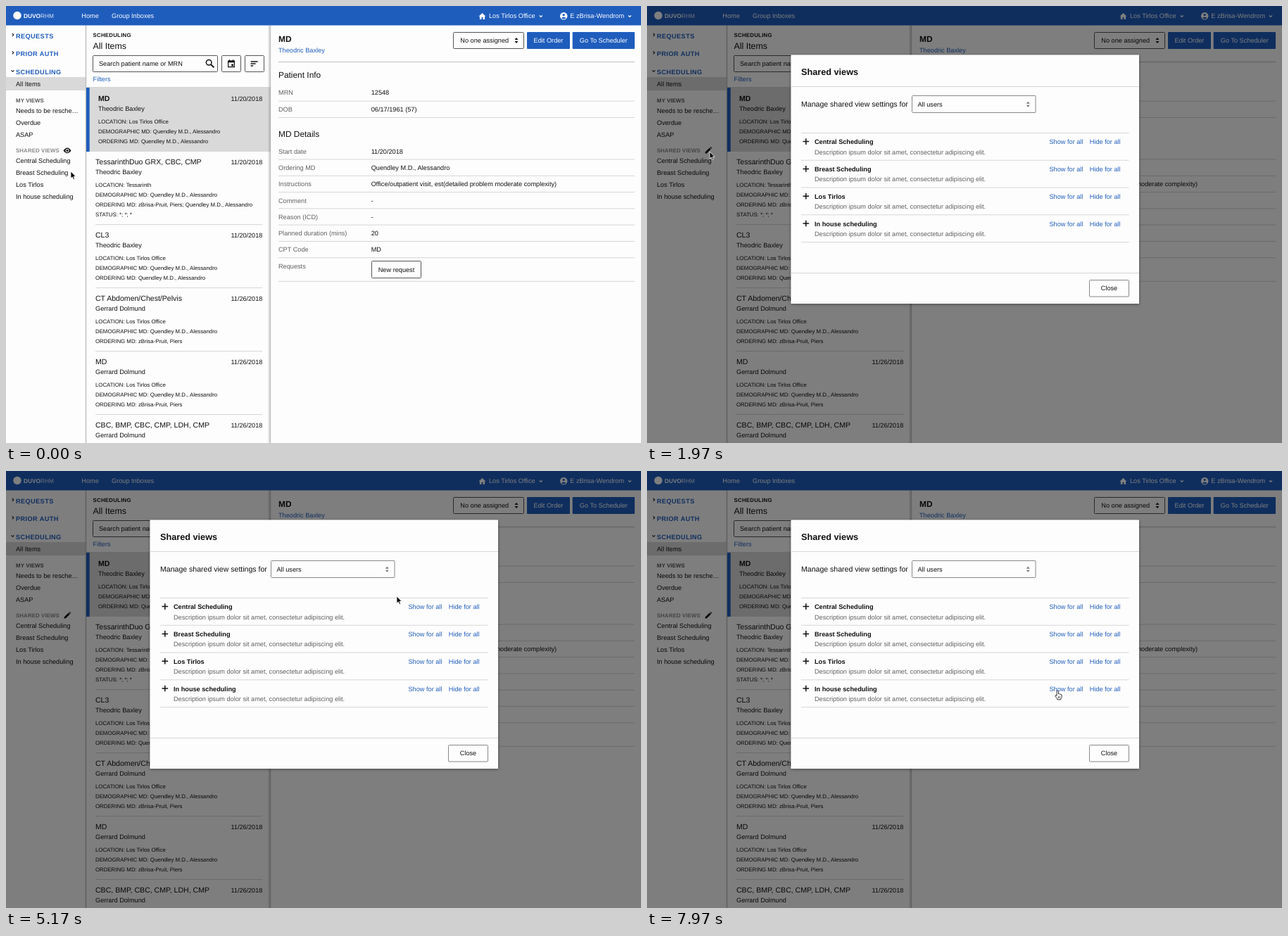
Recreate the animation shown at these times as an HTML page. Size 902 by 621 pixels, loop 8 s.

```html
<!DOCTYPE html>
<html lang="en">
<head>
<meta charset="utf-8">
<title>Scheduling</title>
<style>
  html, body { margin: 0; width: 100%; height: 100%; overflow: hidden; background: #fdfdfd; }
  svg { display: block; width: 902px; height: 621px; }
  text { font-family: "Liberation Sans", Arial, sans-serif; white-space: pre; text-rendering: geometricPrecision; }
</style>
</head>
<body>
<svg id="stage" viewBox="0 0 902 621"></svg>
<script>
const BLUE = '#1f5dbd', INK = '#111', GRAY = '#5f5f5f', RULE = '#d6d6d6', PAPER = '#fdfdfd';
const BODY = 9.18, SMALL = 7.83, ITEM = 10.55, HEADING = 11.9;
const LOOP = 8000, OPEN_AT = 1970;

const OFFICE = 'Los Tirlos Office';
const DOCTOR = 'Quendley M.D., Alessandro';
const SCHEDULER = 'zBrisa-Pruit, Piers';
const PATIENT_A = 'Theodric Baxley', PATIENT_B = 'Gerrard Dolmund';

const text = (x, y, str, { size = BODY, fill = INK, bold = false, anchor = 'start', spacing = 0 } = {}) =>
  `<text x="${x}" y="${y}" font-size="${size}" fill="${fill}" font-weight="${bold ? 700 : 400}" ` +
  `text-anchor="${anchor}" letter-spacing="${spacing}">${str}</text>`;
const rect = (x, y, w, h, fill, more = '') =>
  `<rect x="${x}" y="${y}" width="${w}" height="${h}" fill="${fill}" ${more}/>`;
const rule = (x1, x2, y, color = RULE, width = 1) => rect(x1, y - width / 2, x2 - x1, width, color);
const path = (d, stroke = INK, width = 1.2, fill = 'none', more = '') =>
  `<path d="${d}" stroke="${stroke}" stroke-width="${width}" fill="${fill}" ${more}/>`;
const at = (x, y, content, id = '') => `<g ${id && `id="${id}"`} transform="translate(${x} ${y})">${content}</g>`;

const outlineButton = (x, y, w, h, label = '', stroke = '#555') =>
  rect(x, y, w, h, PAPER, `rx="1" stroke="${stroke}"`) +
  text(x + w / 2, y + h / 2 + 3.2, label, { anchor: 'middle' });
const blueButton = (x, w, label) =>
  rect(x, 37, w, 24, BLUE, 'rx="1"') + text(x + w / 2, 52.3, label, { fill: '#fff', anchor: 'middle' });
const upDown = (x, y, fill) => path(`M${x - 2.5} ${y - 1}l2.5 -3l2.5 3zM${x - 2.5} ${y + 1}l2.5 3l2.5 -3z`, 'none', 0, fill);
const chevronDown = (x, y, color, r = 2) => path(`M${x - r} ${y - r / 2}l${r} ${r}l${r} ${-r}`, color, 1.1);
const chevronRight = (x, y) => path(`M${x - 1} ${y - 2}l2 2l-2 2`, INK, 1.1);

function topBar() {
  const white = { fill: '#fff' };
  return rect(0, 0, 902, 27.5, BLUE) +
    '<circle cx="16" cy="13.5" r="5.7" fill="#fff"/>' +
    text(25, 16.7, 'DUVO', { size: 8.3, fill: '#fff', bold: true }) +
    text(49, 16.7, 'RHM', { size: 8.3, fill: '#dbe6f7' }) +
    text(107.3, 17, 'Home', white) + text(150, 17, 'Group Inboxes', white) +
    path('M671.5 14.8L676.5 10l5 4.8h-1.4v4.2h-2.6v-3h-2v3h-2.6v-4.2z', 'none', 0, '#fff') +
    text(686, 16.8, OFFICE, white) + chevronDown(759.8, 14.5, '#fff') +
    '<circle cx="792.2" cy="14.3" r="5.2" fill="#fff"/>' +
    `<circle cx="792.2" cy="12.6" r="1.7" fill="${BLUE}"/>` +
    path('M788.9 17.1q3.3 -2.6 6.6 0q-3.3 3 -6.6 0z', 'none', 0, BLUE) +
    text(801.3, 16.8, 'E zBrisa-Wendrom', white) + chevronDown(886, 14.5, '#fff');
}

function sidebar() {
  const section = (y, label) => text(14, y, label, { fill: BLUE, bold: true, spacing: .4 });
  const label = (y, str, fill) => text(14, y, str, { size: SMALL, fill, bold: true, spacing: .12 });
  const views = [[114, 'All Items'], [152, 'Needs to be resche…'], [169, 'Overdue'], [185.8, 'ASAP'],
    [223.2, 'Central Scheduling'], [240.2, 'Breast Scheduling'], [257.1, 'Los Tirlos'], [274, 'In house scheduling']];
  return rect(0, 101, 113, 19, '#d9d9d9') +
    chevronRight(9.8, 40.8) + chevronRight(9.8, 66.3) + chevronDown(9.5, 92.3, INK) +
    section(45.7, 'REQUESTS') + section(71.2, 'PRIOR AUTH') + section(96.7, 'SCHEDULING') +
    label(137.4, 'MY VIEWS', '#555') + label(208.3, 'SHARED VIEWS', '#8a8a8a') +
    views.map(([y, str]) => text(14, y, str)).join('') +
    at(87, 205.4, path('M-5.5 0Q0 -7.6 5.5 0Q0 7.6 -5.5 0z', 'none', 0, INK) +
      '<circle r="2.5" fill="#fdfdfd"/><circle r="1.5" fill="#111"/>', 'eye') +
    at(87, 205.2, path('M-4.3 4.3v-2L1.8 -3.8l2 2L-2.3 4.3zM2.4 -4.4l1 -.9l2 2l-1 .9z', 'none', 0, INK), 'pencil') +
    rect(112.7, 27.5, 1.6, 594, '#c2c2c2');
}

function orderItem(y, title, patient, date, lines, selected) {
  const x = selected ? 131 : 127;
  return (selected ? rect(114, 116, 262, 91, '#d9d9d9') + rect(114, 116, 4.7, 91, BLUE) : '') +
    text(x, y, title, { size: ITEM, bold: selected }) +
    text(364.3, y - .2, date, { anchor: 'end', size: 9.1 }) +
    text(x, y + 14.2, patient) +
    lines.map((line, i) => text(x, y + 31.8 + i * 14.15, line, { size: SMALL })).join('') +
    (selected || !lines.length ? '' : rule(127, 364, y + 29.2 + lines.length * 14.1));
}

function orderList() {
  const details = (location, ordering) =>
    ['LOCATION: ' + location, 'DEMOGRAPHIC MD: ' + DOCTOR, 'ORDERING MD: ' + ordering];
  const first = '11/20/2018', second = '11/26/2018';
  return text(123.6, 43.7, 'SCHEDULING', { size: 7.75, bold: true, spacing: .3 }) +
    text(123.5, 60.7, 'All Items', { size: 12.4 }) +
    outlineButton(123.5, 70.5, 177, 23) + text(132, 84.8, 'Search patient name or MRN') +
    '<circle cx="288.2" cy="80.2" r="3.8" fill="none" stroke="#111" stroke-width="1.5"/>' +
    path('M291 83l4.4 4.4', INK, 1.9) +
    outlineButton(306.5, 70.5, 27, 23) +
    path('M315.6 78.3h8.8v8.4h-8.8z', INK, 1.2) + rect(315, 77.5, 10, 2.8, INK) +
    path('M317.5 76.2v2M322.5 76.2v2', INK, 1.2) + rect(320.2, 82.6, 2.8, 2.8, INK) +
    outlineButton(339.5, 70.5, 27, 23) +
    path('M347.6 79h10M347.6 82h7M347.6 85h3.6', INK, 1.3) +
    text(123.6, 107.3, 'Filters', { fill: BLUE }) + rule(114, 376, 115.5) +
    orderItem(135, 'MD', PATIENT_A, first, details(OFFICE, DOCTOR), true) +
    orderItem(225, 'TessarinthDuo GRX, CBC, CMP', PATIENT_A, first,
      [...details('Tessarinth', `${SCHEDULER}; ${DOCTOR}`), 'STATUS: *; *; *']) +
    orderItem(329, 'CL3', PATIENT_A, first, details(OFFICE, DOCTOR)) +
    orderItem(419, 'CT Abdomen/Chest/Pelvis', PATIENT_B, second, details(OFFICE, SCHEDULER)) +
    orderItem(509, 'MD', PATIENT_B, second, details(OFFICE, SCHEDULER)) +
    orderItem(599, 'CBC, BMP, CBC, CMP, LDH, CMP', PATIENT_B, second, []) +
    rect(371.5, 27.5, 5, 594, 'url(#edge)');
}

function orderDetails() {
  const field = (y, label, value) => text(387, y, label, { fill: GRAY }) + text(518.7, y, value);
  const fields = [['Start date', '11/20/2018'], ['Ordering MD', DOCTOR],
    ['Instructions', 'Office/outpatient visit, est(detailed problem moderate complexity)'],
    ['Comment', '-'], ['Reason (ICD)', '-'], ['Planned duration (mins)', '20'], ['CPT Code', 'MD']];
  return rect(376.3, 27.5, 526, 594, PAPER) +
    text(387, 50.8, 'MD', { size: HEADING, bold: true }) + text(387, 65.8, PATIENT_A, { fill: BLUE }) +
    outlineButton(635.5, 37.5, 100, 23) + text(645.3, 52.3, 'No one assigned') + upDown(725, 49, INK) +
    blueButton(740, 61, 'Edit Order') + blueButton(804.7, 88.3, 'Go To Scheduler') +
    rule(387, 893, 79.5, '#cfcfcf', 1.5) +
    text(387, 102.3, 'Patient Info', { size: HEADING }) +
    field(126.4, 'MRN', '12548') + rule(387, 893, 135.2) +
    field(149.7, 'DOB', '06/17/1961 (57)') + rule(387, 893, 158.5) +
    text(387, 185.6, 'MD Details', { size: HEADING }) +
    fields.map(([label, value], i) =>
      field(209.7 + i * 23.28, label, value) + rule(387, 893, 218 + i * 23.28)).join('') +
    field(372.6, 'Requests', '') + outlineButton(519.5, 362.5, 70, 24, 'New request') + rule(387, 893, 391.3);
}

function modal() {
  const link = { fill: BLUE };
  const rows = ['Central Scheduling', 'Breast Scheduling', 'Los Tirlos', 'In house scheduling'];
  return '<g id="modal">' + rect(0, 0, 902, 621, '#000', 'opacity=".5"') +
    rect(204.5, 69.5, 494.5, 353.5, PAPER, 'filter="url(#shadow)"') +
    text(219, 98, 'Shared views', { size: 12.7, bold: true }) + rule(204.5, 699, 114.5) +
    text(219, 143.4, 'Manage shared view settings for', { size: 10.56 }) +
    outlineButton(376.5, 127.5, 175.5, 24, '', '#888') + text(384.5, 143, 'All users') + upDown(541.3, 139.8, '#777') +
    rule(219, 684.5, 180.5) +
    rows.map((name, i) => {
      const y = 196.4 + i * 38.8;
      return path(`M221.5 ${y - 3.8}h8.6M225.8 ${y - 8.1}v8.6`, INK, 1.5) +
        text(238, y, name, { bold: true }) +
        text(238, y + 14.2, 'Description ipsum dolor sit amet, consectetur adipiscing elit.', { fill: GRAY }) +
        text(571.5, y, 'Show for all', link) + text(628.8, y, 'Hide for all', link) +
        rule(219, 684.5, y + 22.8);
    }).join('') +
    rule(204.5, 699, 379.5) + outlineButton(628.5, 389.5, 56, 23.5, 'Close', '#888') + '</g>';
}

const pointers = '<g id="cursor">' +
  path('M0 0V10L2.3 7.9L3.8 11.4L5.5 10.7L4 7.3H7z', '#fff', .8, '#000', 'id="arrow"') +
  path('M-1.2 7V.9Q-1 -.2 0 -.2T1.1 .9V4.2Q2.2 3.6 2.8 4.6Q4 4.1 4.5 5.1Q5.9 5 5.8 6.4V8.6' +
    'Q5.6 10 4.7 11V12.3H-.5V11.2L-3.4 7.6Q-3.8 6.4 -2.8 6.1Q-1.9 6 -1.2 7zM1.2 7.8v2.4M3 7.8v2.4',
    '#000', .8, '#fff', 'id="hand"') + '</g>';

document.getElementById('stage').innerHTML =
  `<defs><linearGradient id="edge"><stop stop-color="#888" stop-opacity="0"/>
    <stop offset="1" stop-color="#888" stop-opacity=".6"/></linearGradient>
    <filter id="shadow"><feDropShadow dx="0" dy="1" stdDeviation="2" flood-opacity=".4"/></filter></defs>` +
  rect(0, 0, 902, 621, PAPER) + sidebar() + orderList() + orderDetails() + topBar() + modal() + pointers;

// Pointer stops: time, x, y.
const stops = [[0, 92, 235], [750, 89, 207], [2500, 89, 207], [3700, 458, 158], [4230, 465, 161],
  [4600, 467, 162], [5170, 555, 178], [5830, 592, 292], [6330, 593.5, 306], [6550, 590, 318],
  [6700, 583.3, 312], [LOOP, 583.3, 312.5]];

function pointerAt(t) {
  const next = stops.findIndex(([time]) => time > t);
  const [t0, x0, y0] = stops[next - 1], [t1, x1, y1] = stops[next];
  const u = (t - t0) / (t1 - t0), eased = u * u * (3 - 2 * u);
  return [x0 + (x1 - x0) * eased, y0 + (y1 - y0) * eased];
}

const show = (id, visible) => document.getElementById(id).setAttribute('visibility', visible ? 'visible' : 'hidden');

function draw() {
  const t = performance.now() % LOOP, open = t >= OPEN_AT;
  const [x, y] = pointerAt(t);
  const overLink = open && x > 571 && x < 620 && y > 187 && y < 320 && (y - 187) % 38.8 < 16;
  document.getElementById('cursor').setAttribute('transform', `translate(${x} ${y})`);
  show('modal', open);
  show('pencil', open);
  show('eye', !open);
  show('arrow', !overLink);
  show('hand', overLink);
  requestAnimationFrame(draw);
}
draw();
</script>
</body>
</html>
```
